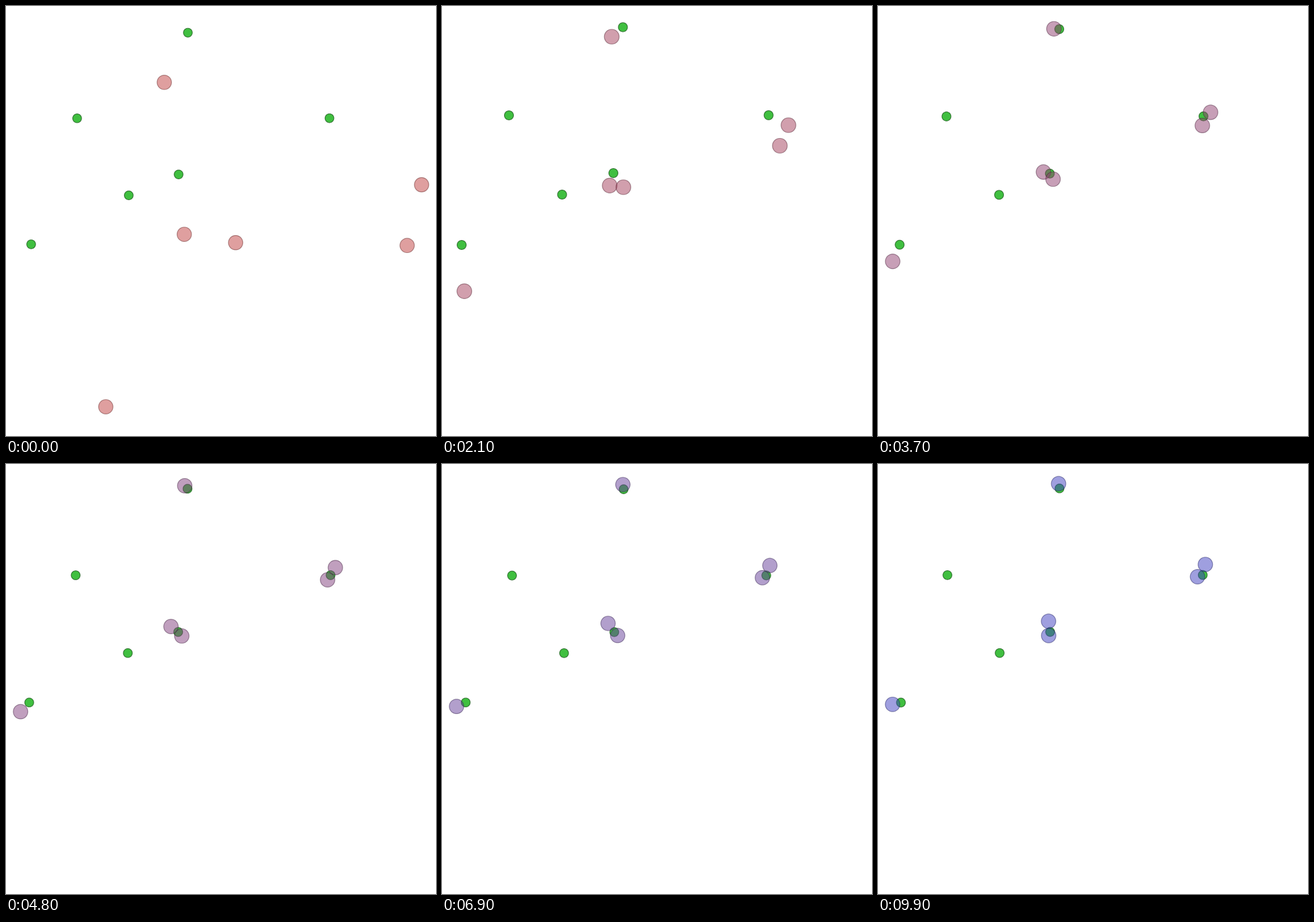
An HTML page with a canvas for the animation above (10 s loop, 700 by 700 pixels).

```html
<!DOCTYPE html>
<html lang="en">
<head>
<meta charset="utf-8">
<title>Agents moving to landmarks</title>
<style>
html, body { margin: 0; width: 100%; height: 100%; overflow: hidden; background: #fff; }
canvas { display: block; width: 700px; height: 700px; }
</style>
</head>
<body>
<canvas id="stage" width="700" height="700"></canvas>
<script>
const ctx = document.getElementById('stage').getContext('2d');
const HALF = 350, STEP = 100, STEPS = 100;
const AGENT_R = 12.07, MARK_R = 7.4;
const RED = [191, 64, 64], BLUE = [64, 64, 191], GREEN = [64, 191, 64];

// All points are offsets from the centre, in pixels at the closest zoom.
const marks = [
  [-55.5, -315.5], [-241, -172], [-154.5, -43],
  [181.7, -172.2], [-318, 39], [-71, -78]
];

// Each agent starts, arrives, is nudged and rests; rate is the approach speed in x and y.
const times = [0, 2.1, 6, 9.9], PICKUP = 6;
const agents = [
  { rate: [0.45, 0.72], path: [[-95, -232.2], [-73.7, -300], [-57.5, -322.6], [-57, -323.4]] },
  { rate: [0.86, 0.7], path: [[336, -60.7], [214, -156], [188.3, -187.7], [186, -189.6]] },
  { rate: [0.78, 0.73], path: [[311.8, 41], [200, -122.5], [175.9, -167.4], [173, -169.3]] },
  { rate: [0.68, 0.55], path: [[-61.5, 22.3], [-77, -57.7], [-83, -90.6], [-73.6, -95.6]] },
  { rate: [0.75, 0.95], path: [[24.5, 36.3], [-54.7, -55], [-64, -72.2], [-73.4, -71.9]] },
  { rate: [1.05, 0.67], path: [[-193, 311.2], [-313.6, 114.3], [-333.4, 48.1], [-331.8, 42]] }
];

const mix = (a, b, u) => a + (b - a) * u;

// Cubic Hermite curve through v at the key times.
function spline(v, t) {
  const last = times.length - 1;
  let i = 0;
  while (i < last - 1 && t > times[i + 1]) i++;
  const slope = j => j === 0 || j === last ? 0
    : (v[j + 1] - v[j - 1]) / (times[j + 1] - times[j - 1]);
  const h = times[i + 1] - times[i], u = (t - times[i]) / h;
  return mix(v[i], v[i + 1], u * u * (3 - 2 * u))
    + h * u * (1 - u) * ((1 - u) * slope(i) - u * slope(i + 1));
}

// Damped approach to the resting place, plus the smooth deviation at the keys.
function track(v, k) {
  const end = v[v.length - 1], span = v[0] - end;
  const base = t => end + span
    * (PICKUP * Math.exp(-k * t) - k * Math.exp(-PICKUP * t)) / (PICKUP - k);
  const rest = v.map((p, i) => p - base(times[i]));
  return t => base(t) + spline(rest, t);
}

const tracks = agents.map(a => a.rate.map((k, axis) => track(a.path.map(p => p[axis]), k)));

function disc([x, y], r, color, alpha, edge, zoom) {
  ctx.beginPath();
  for (let i = 0; i < 30; i++) {
    const a = i * Math.PI / 15;
    ctx.lineTo(HALF + (x + r * Math.cos(a)) / zoom, HALF + (y + r * Math.sin(a)) / zoom);
  }
  ctx.closePath();
  ctx.fillStyle = `rgba(${color.join()},${alpha})`;
  ctx.fill();
  ctx.strokeStyle = `rgba(${color.map(c => c / 2).join()},${edge})`;
  ctx.lineWidth = 1.2;
  ctx.stroke();
}

function draw(ms) {
  const step = Math.floor(ms / STEP) % STEPS, t = step * STEP / 1000;
  const spots = tracks.map(axes => axes.map(f => f(t)));
  // The view widens to keep every agent inside.
  const reach = Math.max(...spots.flat().map(Math.abs)) + 2 * AGENT_R;
  const zoom = Math.max(1, reach / HALF);
  const color = RED.map((c, i) => Math.round(mix(c, BLUE[i], step / (STEPS - 1))));

  ctx.fillStyle = '#fff';
  ctx.fillRect(0, 0, 700, 700);
  marks.forEach(p => disc(p, MARK_R, GREEN, 1, 0.8, zoom));
  spots.forEach(p => disc(p, AGENT_R, color, 0.5, 0.48, zoom));
}

const start = performance.now();
function tick() {
  draw(performance.now() - start);
  requestAnimationFrame(tick);
}
tick();
</script>
</body>
</html>
```
